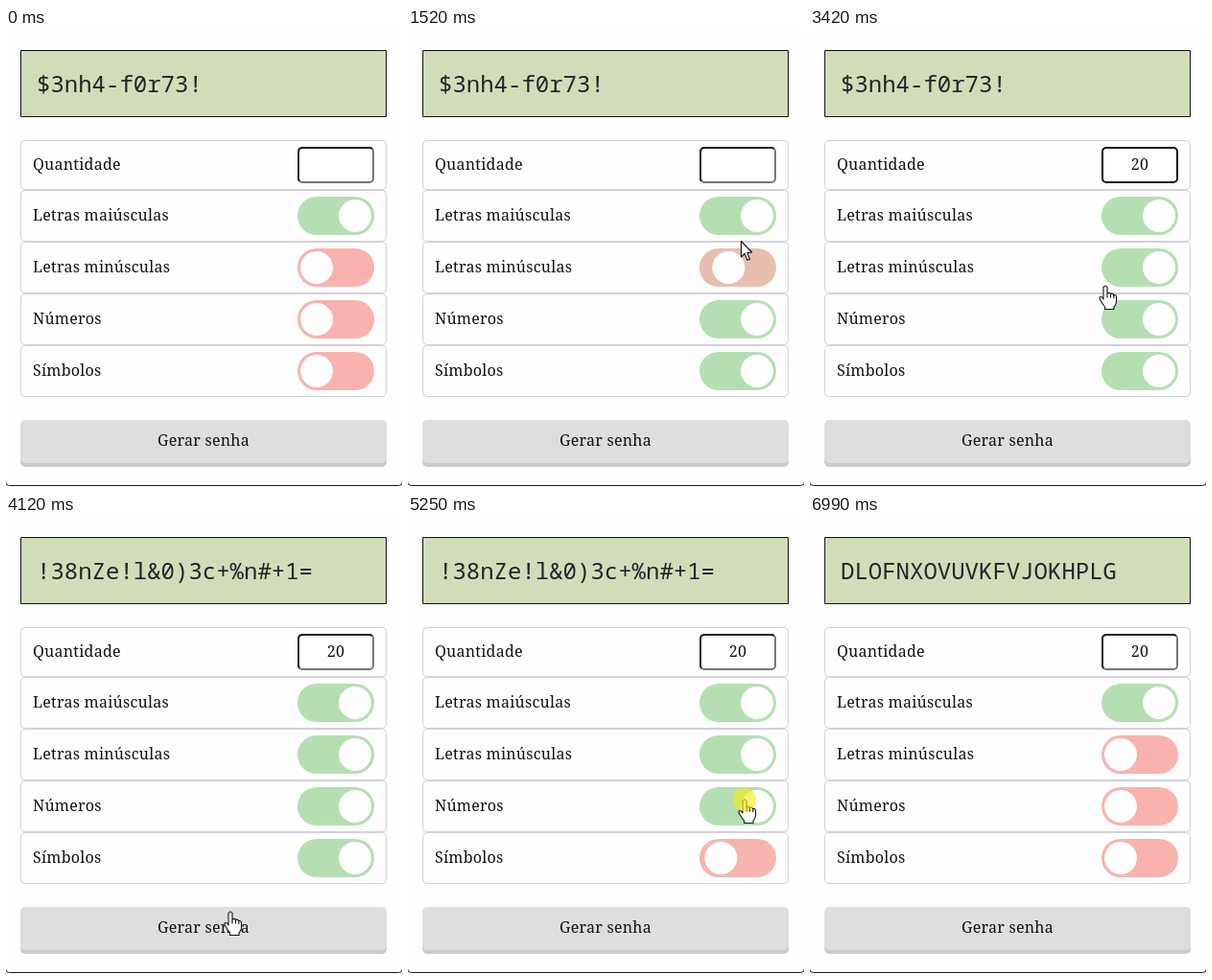
Write an HTML page with a canvas that moves like this. It is 413 px wide and 479 px high and loops after 7.46 s.

```html
<!DOCTYPE html>
<html lang="pt">
<head>
<meta charset="utf-8">
<title>Gerador de senha</title>
<style>
  html, body { margin: 0; width: 100%; height: 100%; overflow: hidden; background: #fdfdfd; }
  canvas { display: block; }
</style>
</head>
<body>
<canvas id="stage" width="413" height="479"></canvas>
<script>
const ctx = document.getElementById('stage').getContext('2d');
const LOOP = 7460, LEAD = 130, STEP = 69.3, PRESS = 75;
const SERIF = '16px "Noto Serif", serif';
const MONO = '24px "Noto Sans Mono", monospace';
const PINK = [250, 178, 174], GREEN = [181, 223, 178];
const LABELS = ['Letras maiúsculas', 'Letras minúsculas', 'Números', 'Símbolos'];
const PASSWORDS = ['$3nh4-f0r73!', '!38nZe!l&0)3c+%n#+1=', 'DLOFNXOVUVKFVJOKHPLG'];

// Pointer stops; the action is a toggle index, 'input' or 'button'
const stop = (arrive, leave, x, y, action, press = leave - PRESS) =>
  ({ arrive, leave, x, y, action, press });
const stops = [
  stop(LEAD, LEAD, 362, 448),
  stop(540, 615, 352, 356, 3),
  stop(960, 1095, 345, 302, 2),
  stop(1320, 1400, 345, 250, 1),
  stop(1720, 2045, 351, 155, 'input', 1860),
  stop(2209, 3150, 360, 169),
  stop(3690, 4120, 234, 414, 'button', 3765),
  stop(4600, 4640, 394, 340),
  stop(4870, 4960, 357, 352, 3),
  stop(5180, 5315, 351, 297, 2),
  stop(5450, 5525, 348, 247, 1),
  stop(6155, 6470, 251, 418, 'button', 6360),
  stop(6920, 6950, 330, 484)
];
const clicksOn = action => stops.filter(s => s.action === action).map(s => s.press);
const buttonClicks = clicksOn('button');
const focusAt = clicksOn('input')[0], blurAt = buttonClicks[0], typeAt = 2605;

const clamp = v => Math.max(0, Math.min(1, v));
const smooth = p => { p = clamp(p); return p * p * (3 - 2 * p); };
const mix = (a, b, p) => a + (b - a) * p;
const inside = (x, y, left, top, w, h) => x >= left && x < left + w && y >= top && y < top + h;
const rowTop = i => 169 + 54 * i;

function box(x, y, w, h, r, fill, stroke, line = 1) {
  ctx.beginPath();
  ctx.roundRect(x, y, w, h, r);
  if (fill) { ctx.fillStyle = fill; ctx.fill(); }
  if (stroke) { ctx.strokeStyle = stroke; ctx.lineWidth = line; ctx.stroke(); }
}

function circle(x, y, r, fill) {
  ctx.beginPath();
  ctx.arc(x, y, r, 0, Math.PI * 2);
  ctx.fillStyle = fill;
  ctx.fill();
}

function text(str, x, y, font = SERIF, align = 'left', color = '#111') {
  ctx.font = font;
  ctx.letterSpacing = font === SERIF ? '0.25px' : '0px';
  ctx.textAlign = align;
  ctx.fillStyle = color;
  ctx.fillText(str, x, y);
}

function row(label, y, h) {
  box(15.5, y + 0.5, 381, h - 1, 4, null, '#d0d1da');
  text(label, 28, y + h / 2 + 5);
}

function drawToggle(label, i, t) {
  const y = rowTop(i), first = i === 0 ? 1 : 0;
  row(label, y, 54);
  const on = clicksOn(i).reduce((p, at, n) =>
    mix(p, (first + n + 1) % 2, smooth((t - at - PRESS) / 350)), first);
  const color = PINK.map((c, k) => Math.round(mix(c, GREEN[k], on)));
  box(304, y + 7, 80, 40, 20, `rgb(${color})`);
  circle(mix(324, 364, on), y + 27, 17, '#fefefe');
}

function drawInput(t) {
  row('Quantidade', 117, 52);
  const focused = t >= focusAt && t < blurAt;
  box(305, 125, 78, 36, 4, '#fff', focused ? '#101010' : '#767676', 2);
  if (!focused) {
    // Inset border: dark on the top and left only
    ctx.save();
    ctx.beginPath();
    ctx.moveTo(302, 164);
    ctx.lineTo(302, 122);
    ctx.lineTo(386, 122);
    ctx.lineTo(365, 143);
    ctx.lineTo(323, 143);
    ctx.clip();
    box(305, 125, 78, 36, 4, null, '#2b2020', 2);
    ctx.restore();
  }
  const typed = Math.max(0, Math.min(2, Math.floor((t - typeAt) / 70) + 1));
  const value = '20'.slice(0, typed);
  text(value, 344, 148, SERIF, 'center');
  const blinkFrom = typed ? typeAt + 70 * (typed - 1) : focusAt + 45;
  if (focused && Math.floor((t - blinkFrom) / 500) % 2 === 0) {
    ctx.fillStyle = '#111';
    ctx.fillRect(Math.round(344 + ctx.measureText(value).width / 2), 133, 1, 19);
  }
}

function drawButton(t) {
  const press = Math.max(...buttonClicks.map(at =>
    smooth((t - at + 30) / 80) * (1 - smooth((t - at - PRESS) / 200))));
  const dy = 4 * press;
  box(15, 413 + dy, 382, 45 - dy, 5, '#c8cccb');
  box(15, 409 + dy, 382, 45, 5, '#dddfde');
  text('Gerar senha', 206, 436 + dy, SERIF, 'center');
}

function pointerAt(t) {
  const i = stops.findIndex(s => s.leave > t);
  const from = stops[Math.max(0, i - 1)], to = stops[i];
  const p = smooth((t - from.leave) / (to.arrive - from.leave));
  return [mix(from.x, to.x, p), mix(from.y, to.y, p)];
}

const hand = new Path2D('M-2 1.5Q0-1.5 2 1.5V8Q4 6.5 5.5 8.5Q7.5 7.5 8.8 9.6Q11.5 9 11.5 12V17Q11 20 9 22V24.5H-.5V22Q-3 19-5.5 14.5Q-7 11.5-4.5 11.5Q-3 11.5-2 14Z');
const knuckles = new Path2D('M2 8V12.5M5.5 8.5V12.5M8.8 9.6V13');
const arrow = new Path2D('M.5.5V17L4.2 13.4L6.9 20.3L9.5 19.2L6.8 12.6L11.6 12Z');
const beam = new Path2D('M-3.5-8.5H-1L0-7.5L1-8.5H3.5M0-7.5V7.5M-3.5 8.5H-1L0 7.5L1 8.5H3.5');

function drawPointer(t) {
  if (t < LEAD || t >= stops[stops.length - 1].leave) return;
  const [x, y] = pointerAt(t).map(Math.round);
  const overLink = inside(x, y, 15, 409, 382, 49) ||
    LABELS.some((_, i) => inside(x, y, 304, rowTop(i) + 7, 80, 40));
  ctx.save();
  ctx.translate(x, y);
  ctx.lineWidth = 1.1;
  ctx.lineJoin = 'round';
  ctx.strokeStyle = '#111';
  ctx.fillStyle = '#fff';
  if (inside(x, y, 304, 124, 80, 38)) {
    ctx.stroke(beam);
  } else {
    const shape = overLink ? hand : arrow;
    ctx.fill(shape);
    ctx.stroke(shape);
    if (overLink) ctx.stroke(knuckles);
  }
  ctx.restore();
  const pressed = stops.some(s => s.action !== undefined && t >= s.press && t < s.press + PRESS);
  if (pressed) circle(x, y, 12, 'rgba(245, 235, 20, .65)');
}

function draw(t) {
  ctx.fillStyle = '#fdfdfd';
  ctx.fillRect(0, 0, 413, 479);
  box(-0.5, -0.5, 414, 478, [0, 0, 4, 4], '#fefefe', '#1c1f22');

  box(15.5, 23.5, 381, 69, 0, '#d1ddb8', '#111');
  const made = buttonClicks.filter(at => t >= at + PRESS).length;
  text(PASSWORDS[made], 32, 67, MONO, 'left', '#222428');

  drawInput(t);
  LABELS.forEach((label, i) => drawToggle(label, i, t));
  drawButton(t);
  drawPointer(t);
}

// The picture advances in even steps after a short lead-in
function stepped(t) {
  return t < LEAD ? 0 : LEAD + Math.floor((t - LEAD + 12) / STEP) * STEP;
}

const start = performance.now();
function tick() {
  draw(stepped((performance.now() - start) % LOOP));
  requestAnimationFrame(tick);
}
tick();
</script>
</body>
</html>
```
